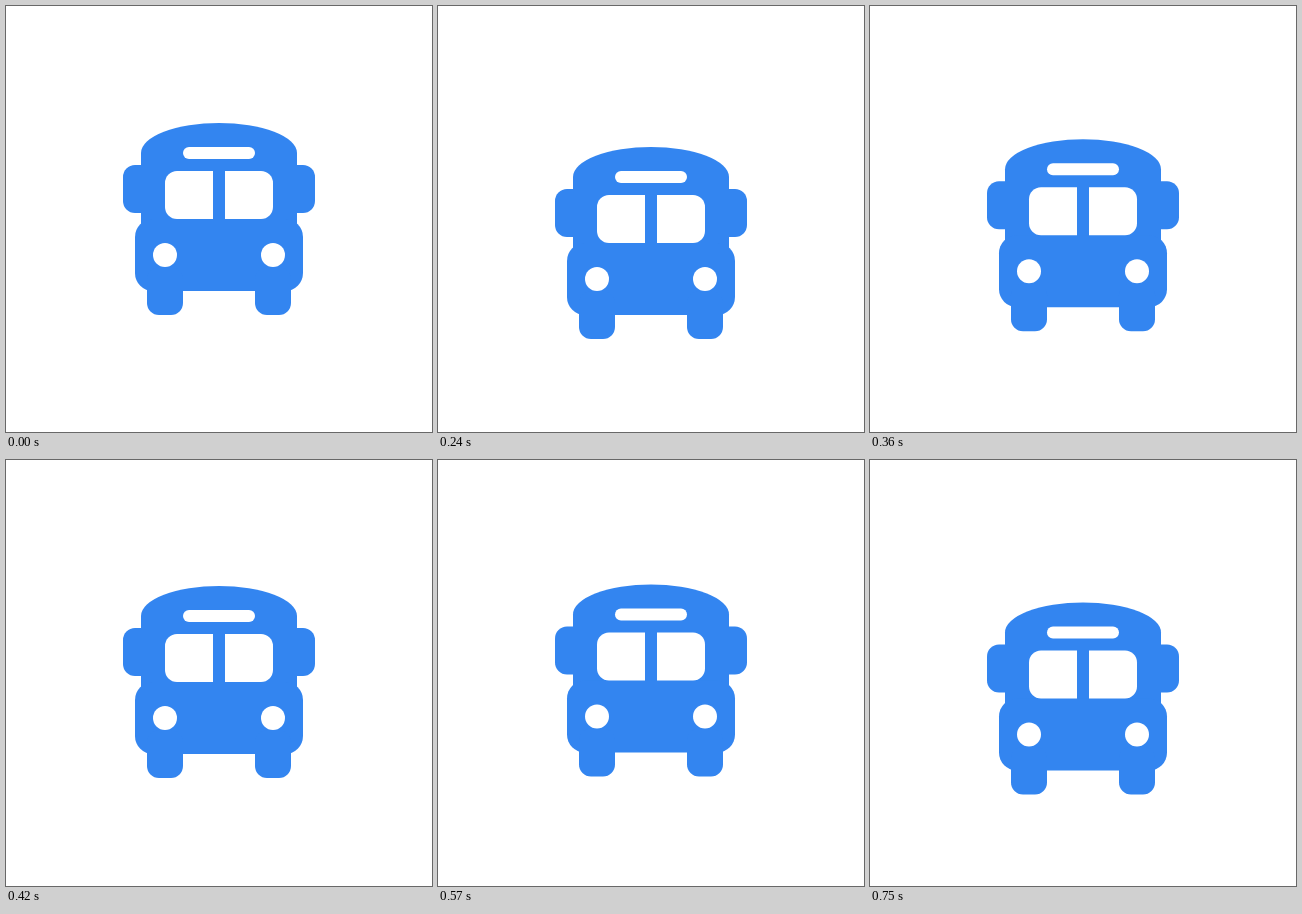
Animation, 426 px wide and 426 px high, one loop 780 ms. Source, as an HTML page:

```html
<!DOCTYPE html>
<html lang="en">
<head>
<meta charset="utf-8">
<title>Bouncing bus</title>
<style>
  html, body { margin: 0; width: 100%; height: 100%; overflow: hidden; background: #fff; }
  svg { display: block; width: 100vw; height: 100vh; }
</style>
</head>
<body>
<svg viewBox="0 0 426 426">
  <g id="bus">
    <g fill="#3385f0">
      <path d="M135 147A78 30 0 0 1 291 147V225H135Z"/>
      <path d="M135 159H129a12 12 0 0 0-12 12v24a12 12 0 0 0 12 12h6Z"/>
      <path d="M291 159h6a12 12 0 0 1 12 12v24a12 12 0 0 1-12 12h-6Z"/>
      <rect x="129" y="213" width="168" height="72" rx="18"/>
      <rect x="141" y="261" width="36" height="48" rx="12"/>
      <rect x="249" y="261" width="36" height="48" rx="12"/>
    </g>
    <g fill="#fff">
      <rect x="177" y="141" width="72" height="12" rx="6"/>
      <path d="M207 165h-36a12 12 0 0 0-12 12v24a12 12 0 0 0 12 12h36Z"/>
      <path d="M219 165h36a12 12 0 0 1 12 12v24a12 12 0 0 1-12 12h-36Z"/>
      <circle cx="159" cy="249" r="12"/>
      <circle cx="267" cy="249" r="12"/>
    </g>
  </g>
</svg>
<script>
  const LOOP = 780, STEP = 30;
  const BOUNCE = 495, DOWN = 270, DEPTH = 27;
  const bus = document.getElementById('bus');

  // Sinks at a steady rate, then rises slightly faster.
  function offset(time) {
    const t = time % BOUNCE;
    return DEPTH * (t < DOWN ? t / DOWN : (BOUNCE - t) / (BOUNCE - DOWN));
  }

  function draw() {
    const time = Math.floor(performance.now() % LOOP / STEP) * STEP;
    bus.setAttribute('transform', `translate(0 ${offset(time)})`);
    requestAnimationFrame(draw);
  }
  draw();
</script>
</body>
</html>
```
